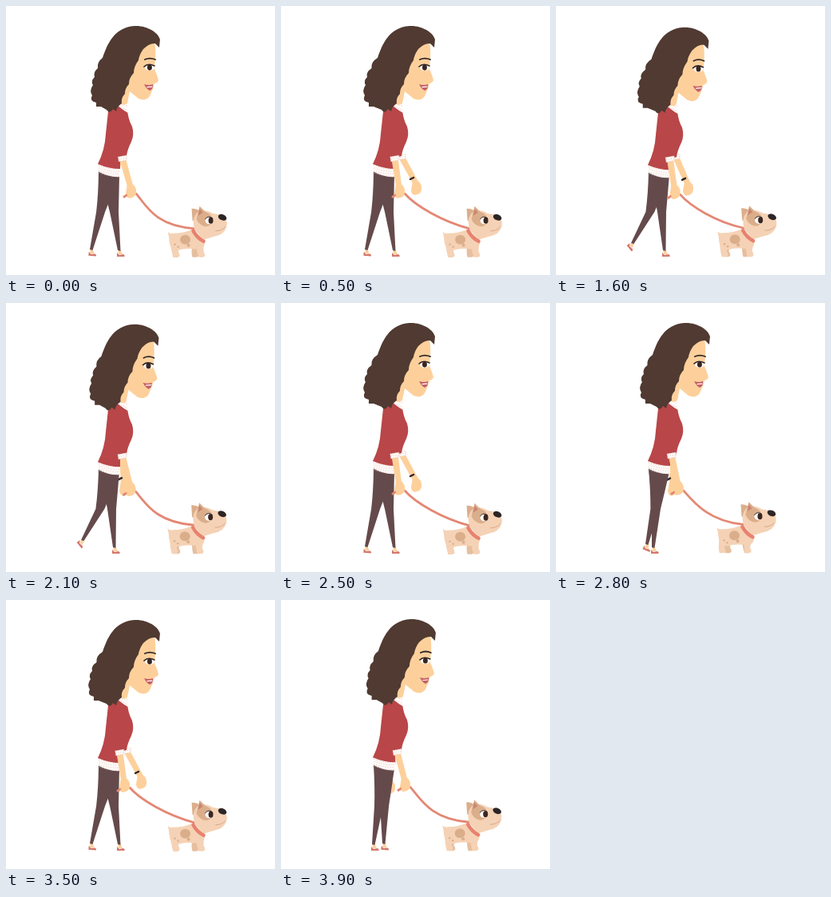
An HTML page with a canvas that plays this animation: 337 by 337 pixels, repeating every 4 s.

```html
<!DOCTYPE html>
<html lang="en">
<head>
<meta charset="utf-8">
<title>Walking the dog</title>
<style>
html, body { margin: 0; width: 100%; height: 100%; overflow: hidden; background: #fff; }
canvas { display: block; width: 337px; height: 337px; }
</style>
</head>
<body>
<canvas id="stage" width="337" height="337"></canvas>
<script>
const ctx = document.getElementById('stage').getContext('2d');
const HAIR = '#503a31', SKIN = '#fdd09b', SWEATER = '#b94648', TROUSERS = '#654a4c',
  SHOE = '#d4776b', LEASH = '#e38874', FUR = '#f5d2b5', TAN = '#dbae8b', DARK = '#2c2526';

// Ten poses per stride
const FOOT_X = [142, 136, 129, 122, 116, 107, 96, 100, 114, 129];
const FOOT_LIFT = [0, 0, 0, 0, 0, 1, 9, 9, 4, 1];
const FAR_HAND_X = [134, 148, 156, 163, 167, 169, 165, 156, 146, 136];

function fill(color, path) {
  ctx.fillStyle = color;
  ctx.fill(new Path2D(path));
}

function line(color, width, path, dash = []) {
  ctx.strokeStyle = color;
  ctx.lineWidth = width;
  ctx.lineCap = dash.length ? 'butt' : 'round';
  ctx.lineJoin = 'round';
  ctx.setLineDash(dash);
  ctx.stroke(new Path2D(path));
}

function oval(color, x, y, rx, ry, turn = 0) {
  ctx.fillStyle = color;
  ctx.beginPath();
  ctx.ellipse(x, y, rx, ry, turn, 0, 7);
  ctx.fill();
}

function moved(x, y, draw) {
  ctx.save();
  ctx.translate(x, y);
  draw();
  ctx.restore();
}

function leg(pose) {
  const x = FOOT_X[pose], lift = FOOT_LIFT[pose], y = 307 - lift;
  const knee = (129 + x) / 2 + lift * 0.6;
  ctx.save();
  ctx.translate(x, y);
  ctx.rotate(lift * 0.1);
  fill(SKIN, 'M-2-2L1-2L4 4L-1 4Z');
  fill(SHOE, 'M-3 2L0 5L5 4Q8 6 6 7L0 7L-3 7Z');
  ctx.restore();
  fill(TROUSERS, `M116 207L142 211Q${(142 + knee + 5.5) / 2} 236 ${knee + 5.5} 258
    L${x + 1.5} ${y}L${x - 2} ${y - 1}L${knee - 5.5} 258Q${(118 + knee - 5) / 2} 235 116 207Z`);
}

function arm(x, y, hx, hy) {
  fill(SKIN, `M${x - 4} ${y}L${x + 4} ${y - 1}L${hx + 3} ${hy - 8}L${hx - 4} ${hy - 6}Z`);
  fill(SKIN, `M${hx - 4} ${hy - 9}Q${hx + 5} ${hy - 11} ${hx + 7} ${hy - 2}
    Q${hx + 8} ${hy + 6} ${hx + 2} ${hy + 8}Q${hx - 5} ${hy + 11} ${hx - 6} ${hy + 3}Z`);
}

function cuff(x, y) {
  const edge = `M${x - 6} ${y - 1}L${x + 5} ${y - 3}L${x + 5} ${y + 3}L${x - 5} ${y + 5}Z`;
  fill('#fffaf8', edge);
  line('#e3c3bb', 1, edge + `M${x - 5} ${y + 2}L${x + 5} ${y}`, [1, 2]);
}

function head(sway) {
  fill(SKIN, `M186 45Q188 55 187 67L186 79Q190 88 191 93Q190 96 186 97L184 104L180 113
    Q175 120 166 116L155 107L152 122Q146 126 140 120L148 85L165 50Z`);
  fill(HAIR, `M161 25C176 24 191 33 193 42L192 52L187 47Q180 46 172 54
    Q167 61 166 68Q160 76 160 84Q154 90 154 98Q149 103 149 110Q144 115 145 122
    Q139 126 138 132L134 129Q130 136 126 130L${119 + sway} 126L${113 + sway} 126L${113 + sway} 121
    Q${104 + sway} 119 ${108 + sway} 112Q${104 + sway} 106 ${109 + sway} 99
    Q${106 + sway} 94 ${111 + sway} 89Q${109 + sway} 83 ${115 + sway * .5} 78
    Q${114 + sway * .5} 70 121 65C127 48 135 27 161 25Z`);
  line(DARK, 1.8, 'M174 67Q180 64 187 67');
  oval('#fff', 180, 77, 6, 4);
  oval('#3b2620', 180, 77, 3, 3.6);
  line(DARK, 1.6, 'M173 76Q178 71 186 75');
  fill('#c46068', 'M173 98Q179 100 184 98Q185 104 180 106Q176 104 173 98Z');
  line('#fff', 1.2, 'M177 101.5L183 101');
}

function torso() {
  fill('#fffaf8', 'M115 198L143 203L143 214Q129 215 115 207Z');
  for (let i = 0; i < 4; i++) {
    line('#e3c3bb', 1, `M${116 + i % 2} ${200 + i * 3}Q130 ${205 + i * 3} 142 ${204 + i * 3}`, [1, 2]);
  }
  fill(SWEATER, `M141 121L152 130Q153 142 158 151Q161 161 157 170Q152 180 151 188L143 190
    L143 204Q129 204 115 198Q124 180 125 160L128 132Q134 124 141 121Z`);
  fill('#fffaf8', 'M141 119L152 122L153 134L148 131L140 125Z');
  line('#e3c3bb', 1, 'M142 122L152 125M142 125L152 131', [1, 2]);
}

function paw(x, shift, shade) {
  fill(shade, `M${x - 5} 296L${x + 5} 296L${x + 3 + shift} 307Q${x + 7 + shift} 313 ${x + 2 + shift} 314
    L${x - 3 + shift} 314Q${x - 5 + shift} 309 ${x - 5} 296Z`);
}

function dog(swing) {
  paw(214, -swing, '#e6bf9f');
  paw(238, -swing, '#e6bf9f');
  paw(210, swing, FUR);
  paw(242, swing, FUR);
  fill(FUR, `M202 282Q204 285 209 284Q222 284 233 279L248 292Q250 304 239 304
    Q224 302 216 305Q205 306 204 294Q204 289 202 282Z`);
  oval(TAN, 224, 292, 6.5, 6);
  oval(TAN, 228, 299, 2, 2);
  oval(TAN, 211, 298, 1.2, 1.2);
  oval(TAN, 215, 301, 1.2, 1.2);
  fill(TAN, 'M232 253Q240 253 244 258L239 271L233 268Z');
  fill(FUR, `M240 257Q250 253 258 259L269 261Q278 267 276 275Q273 286 260 288
    L247 292L236 280Q231 265 240 257Z`);
  fill(TAN, 'M242 250L249 257Q259 260 258 269Q255 277 247 275Q240 272 238 266Z');
  fill('#c98672', 'M242 253L246 258L240 262Z');
  oval('#fff', 254, 268, 5, 4.5);
  oval('#3b2620', 256, 268, 3, 4);
  line(DARK, 1, 'M249 266Q253 261 258 265');
  oval(DARK, 270.5, 264, 5.5, 3.6, 0.4);
  line('#d9a88c', 1, 'M262 281Q270 281 274 276');
  line('#e8826f', 4.5, 'M234 281Q239 290 247 294');
}

function draw(ms) {
  const pose = Math.floor(ms / 100) % 10;
  const turn = pose / 10 * Math.PI * 2;
  const bob = 0.5 + 1.5 * Math.cos(2 * turn - 0.6 * Math.PI);
  const trot = Math.cos(2 * turn);
  const handX = 152 + 4 * Math.cos(turn - 0.1), handY = 232 + bob * 0.7;
  const cuffX = 144.5 + 1.8 * Math.cos(turn);
  const farX = FAR_HAND_X[pose], farY = 235 - (farX - 134) * 0.2;
  const farCuff = 146 + (farX - 148) * 0.25;
  const sag = (1 + Math.cos(turn)) / 2;

  ctx.clearRect(0, 0, 337, 337);
  arm(farCuff, 190, farX, farY);
  line(DARK, 2.5, `M${farX - 7} ${farY - 11}L${farX - 3} ${farY - 13}`);
  cuff(farCuff, 188);
  leg((pose + 5) % 10);
  leg(pose);

  moved(0, bob * 0.7, torso);
  moved(-bob * 0.9, bob, () => head(1.5 * Math.cos(turn) - 1.5));

  const dogY = trot * 0.8;
  line(LEASH, 2.8, `M${handX - 8} ${handY + 7}Q${handX} ${handY + 2} ${handX + 7} ${handY + 3}
    C${handX + 20} ${handY + 18} ${202 - 16 * sag} ${270 + 5 * sag} ${235 + trot} ${278 + dogY}`);
  arm(cuffX, 193, handX, handY);
  line(LEASH, 2.5, `M${handX - 8} ${handY + 7}L${handX - 5} ${handY + 5}`);
  cuff(cuffX, 190 + bob * 0.5);
  moved(trot * 0.6, dogY, () => dog(trot * 2));
}

function tick() {
  draw(performance.now() % 4000);
  requestAnimationFrame(tick);
}
tick();
</script>
</body>
</html>
```
